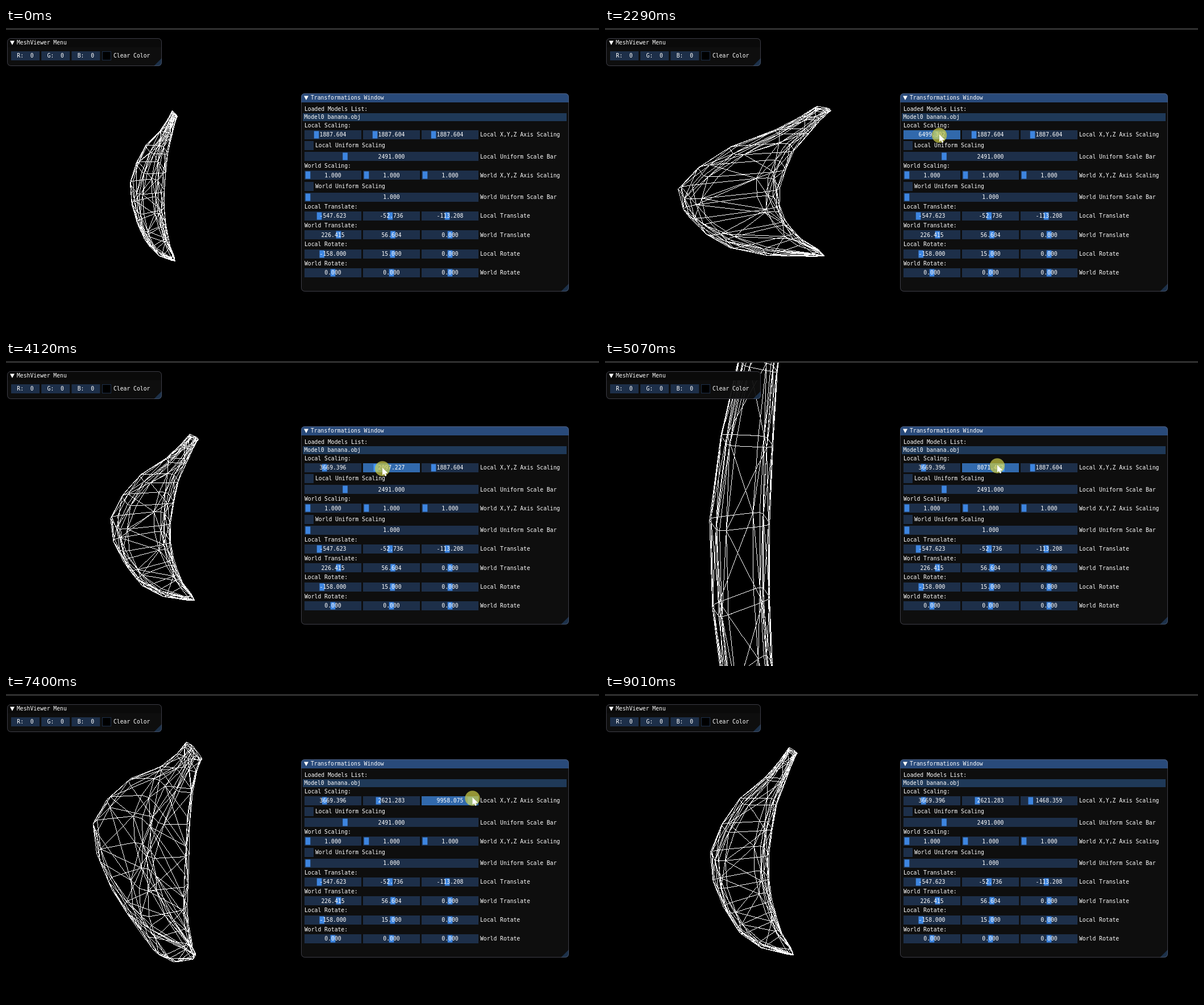
An HTML page with a canvas for the animation above (9550 ms loop, 1043 by 537 pixels).

```html
<!DOCTYPE html>
<html lang="en">
<head>
<meta charset="utf-8">
<title>Mesh viewer</title>
<style>
html, body { margin: 0; width: 100%; height: 100%; overflow: hidden; background: #000; }
canvas { display: block; }
</style>
</head>
<body>
<canvas id="view" width="1043" height="537"></canvas>
<script>
const W = 1043, H = 537, LOOP = 9550;
const ctx = document.getElementById('view').getContext('2d');
const image = ctx.createImageData(W, H);
const pixels = new Uint32Array(image.data.buffer);

const FRAME = 'rgb(29,47,73)', HOVER = 'rgb(35,69,109)', ACTIVE = 'rgb(49,105,172)';
const GRAB = 'rgb(61,133,224)', GRAB_ON = 'rgb(66,150,250)';
const PANEL = 'rgba(15,15,15,.94)', BORDER = 'rgba(110,110,128,.5)';

// Monotone curve through [position, value] keys.
function track(...keys) {
  const slope = i => (keys[i + 1][1] - keys[i][1]) / (keys[i + 1][0] - keys[i][0]);
  const tangent = i => {
    if (i === 0 || i === keys.length - 1) return 0;
    const a = slope(i - 1), b = slope(i);
    return a * b > 0 ? 2 * a * b / (a + b) : 0;
  };
  return t => {
    if (t <= keys[0][0]) return keys[0][1];
    const i = keys.findIndex(k => k[0] > t) - 1;
    if (i < 0) return keys[keys.length - 1][1];
    const [t0, v0] = keys[i], [t1, v1] = keys[i + 1];
    const d = t1 - t0, u = (t - t0) / d, w = 1 - u;
    return v0 * w * w * (1 + 2 * u) + v1 * u * u * (3 - 2 * u)
      + d * u * w * (tangent(i) * w - tangent(i + 1) * u);
  };
}

// The pointer enters, drags each slider out and back, then leaves.
const pointerX = track(
  [120, 963], [1070, 546], [1330, 546],
  [2220, 582.8], [2290, 588], [2480, 593], [3450, 560.3],
  [3790, 648], [3990, 649.1], [4050, 650.7], [4120, 662], [4800, 714], [5000, 698.4], [5070, 690], [5560, 654.9],
  [5780, 654.9], [6340, 752], [6480, 752.1], [6610, 757.1], [6680, 771], [7330, 816.4], [7400, 820.5], [8350, 748.7],
  [8540, 748.7], [8950, 991]
);
const pointerY = track([120, 523], [1070, 187], [4120, 188], [5070, 183], [7400, 182], [8540, 187], [8950, 506]);
const drags = [[1330, 3450], [3990, 5780], [6480, 8540]];

// A scale follows the pointer a little late, in whole slider steps.
const LAG = 70, STEP = 104.811318, STEP_PX = 0.836;
const sliderX = i => 525 + 103 * i;
function scaleAt(t, i) {
  const [from, to] = drags[i];
  const x = pointerX(Math.max(from, Math.min(to, t - LAG)));
  return Math.min(10000, 1.0002 + STEP * Math.round((x - sliderX(i) - 6) / STEP_PX));
}

// Banana: cross sections spanned between an outer and an inner edge.
const RINGS = 13, SIDES = 12, CX = 260.5, CY = 277;
const outerX = track([0, 324], [0.2, 301], [0.35, 234], [0.53, 188], [0.8, 240], [1, 330]);
const innerX = track([0, 337], [0.2, 323], [0.35, 298], [0.56, 283], [0.87, 309], [1, 331]);
const bulge = v => Math.sign(v) * Math.abs(v) ** 0.3;
const toModel = (x, y) => [(x - CX) / 3544, (y - CY + 0.1 * (x - CX)) / 2430];

const mesh = Array.from({ length: RINGS }, (_, i) => {
  const u = Math.max(0, Math.min(1, 0.088 * (i - 0.15)));
  const y = CY - 182 * Math.cos(Math.PI * u);
  const lift = 29 * Math.sin(Math.PI * u ** 3) - 8 * (1 - u) ** 2;
  const [x0, y0] = toModel(outerX(u), y);
  const [x1, y1] = toModel(innerX(u), y - lift);
  const depth = 0.65 * Math.hypot(x1 - x0, y1 - y0);
  return Array.from({ length: SIDES }, (_, j) => {
    const a = (j + 0.5) * 2 * Math.PI / SIDES;
    const k = (1 + bulge(Math.cos(a))) / 2;
    return [x0 + (x1 - x0) * k, y0 + (y1 - y0) * k, depth * bulge(Math.sin(a))];
  });
});

function line([x0, y0], [x1, y1]) {
  const n = Math.max(1, Math.ceil(Math.max(Math.abs(x1 - x0), Math.abs(y1 - y0))));
  for (let i = 0; i <= n; i++) {
    const x = Math.round(x0 + (x1 - x0) * i / n), y = Math.round(y0 + (y1 - y0) * i / n);
    if (x >= 0 && x < W && y > 2 && y < H) pixels[y * W + x] = 0xffffffff;
  }
}

function drawMesh([sx, sy, sz]) {
  pixels.fill(0xff000000);
  const pts = mesh.map(ring => ring.map(([x, y, z]) => [
    CX + 0.966 * x * sx + 0.259 * z * sz,
    CY + 0.927 * y * sy - 0.097 * x * sx + 0.362 * z * sz
  ]));
  pts.forEach((ring, i) => ring.forEach((p, j) => {
    const k = (j + 1) % SIDES, next = pts[i + 1];
    line(p, ring[k]);
    if (!next) return;
    line(p, next[j]);
    if ((i + j) % 2) line(p, next[k]);
    else line(ring[k], next[j]);
  }));
  ctx.putImageData(image, 0, 0);
}

function rect(x, y, w, h, color) {
  ctx.fillStyle = color;
  ctx.fillRect(x, y, w, h);
}

function poly(points, color) {
  ctx.fillStyle = color;
  ctx.beginPath();
  points.forEach(([x, y]) => ctx.lineTo(x, y));
  ctx.closePath();
  ctx.fill();
}

function text(str, x, cy, align = 'left') {
  ctx.fillStyle = '#fff';
  ctx.textAlign = align;
  ctx.fillText(str, x, Math.round(cy + 3.4));
}

function panel(x, y, w, h, title, titleColor) {
  ctx.save();
  ctx.beginPath();
  ctx.roundRect(x, y, w, h, 6);
  ctx.clip();
  rect(x, y, w, h, PANEL);
  rect(x, y, w, 16, titleColor);
  poly([[x + w, y + h - 14], [x + w, y + h], [x + w - 14, y + h]], 'rgb(28,49,74)');
  ctx.restore();
  ctx.strokeStyle = BORDER;
  ctx.lineWidth = 1;
  ctx.beginPath();
  ctx.roundRect(x + 0.5, y + 0.5, w - 1, h - 1, 6);
  ctx.stroke();
  poly([[x + 5, y + 4.5], [x + 13, y + 4.5], [x + 9, y + 12]], '#fff');
  text(title, x + 17, y + 8);
}

function frame(x, cy, w, color = FRAME) {
  rect(x, Math.round(cy) - 8, w, 16, color);
}

// The grab sits at origin + value * unit pixels.
function slider(x, cy, w, value, origin, unit, state = 0) {
  frame(x, cy, w, [FRAME, HOVER, ACTIVE][state]);
  rect(x + origin + value * unit - 4.3, Math.round(cy) - 6.5, 8.6, 13, state === 2 ? GRAB_ON : GRAB);
  text(value.toFixed(3), x + w / 2, cy, 'center');
}

function drawMenu() {
  panel(2, 18, 272, 49, 'MeshViewer Menu', 'rgb(10,10,10)');
  [...'RGB'].forEach((c, i) => {
    const x = 9 + 53.2 * i;
    frame(x, 49, 50);
    text(c + ':  0', x + 25, 49, 'center');
  });
  frame(169, 49, 16);
  rect(170, 42, 14, 14, '#000');
  text('Clear Color', 189, 49);
}

function drawTransforms(scale, states) {
  const LABEL = 16.65, ROW = 19.15, LEFT = 525, RIGHT = 834;
  let y = 171.2;

  const vector = (heading, label, values, origin, unit, active = []) => {
    text(heading + ':', LEFT, y);
    y += LABEL;
    values.forEach((v, i) => slider(sliderX(i), y, 100, v, origin, unit, active[i]));
    text(label, RIGHT, y);
  };
  const scaling = (space, values, size, active) => {
    vector(space + ' Scaling', space + ' X,Y,Z Axis Scaling', values, 6, STEP_PX / STEP, active);
    y += ROW;
    frame(LEFT, y, 16);
    text(space + ' Uniform Scaling', LEFT + 19, y);
    y += ROW;
    slider(LEFT, y, 306, size, 6, 0.0263);
    text(space + ' Uniform Scale Bar', RIGHT, y);
    y += LABEL;
  };
  const centered = (name, values, unit) => {
    vector(name, name, values, 50, unit);
    y += LABEL;
  };

  panel(519, 115, 471, 349, 'Transformations Window', 'rgb(41,74,122)');
  text('Loaded Models List:', LEFT, 143);
  rect(522, 150, 464, 14, 'rgb(31,57,88)');
  text('Model0 banana.obj', LEFT - 0.5, 157);
  scaling('Local', scale, 2491, states);
  scaling('World', [1, 1, 1], 1);
  centered('Local Translate', [-547.623, -52.736, -113.208], 0.0437);
  centered('World Translate', [226.415, 56.604, 0], 0.0437);
  centered('Local Rotate', [-158, 15, 0], 0.122);
  centered('World Rotate', [0, 0, 0], 0.122);
}

function drawPointer(x, y, pressed) {
  if (pressed) {
    ctx.fillStyle = 'rgba(205,205,70,.7)';
    ctx.beginPath();
    ctx.arc(x, y + 1.5, 13.2, 0, 2 * Math.PI);
    ctx.fill();
  }
  poly([[0, 0], [0, 13], [3, 10.4], [5, 15], [7.2, 14], [5.3, 9.7], [9.5, 9.5]]
    .map(([dx, dy]) => [x + dx, y + dy]), '#fff');
}

function draw(t) {
  const scale = drags.map((_, i) => scaleAt(t, i));
  const x = pointerX(t), y = pointerY(t);
  const visible = t >= 120 && t < 9010;
  const held = drags.findIndex(([from, to]) => t >= from && t < to);
  const states = drags.map((_, i) => {
    if (held >= 0) return held === i ? 2 : 0;
    const over = x >= sliderX(i) && x < sliderX(i) + 100 && y >= 180 && y < 196;
    return visible && t > drags[0][0] && over ? 1 : 0;
  });

  drawMesh(scale);
  rect(0, 0, W, 1, '#1c1c1c');
  rect(0, 1, W, 2, '#383838');
  ctx.font = '9.72px "DejaVu Sans Mono", "Liberation Mono", monospace';
  drawMenu();
  drawTransforms(scale, states);
  if (visible) drawPointer(x, y, held >= 0);
}

const start = performance.now();
function tick() {
  draw((performance.now() - start) % LOOP);
  requestAnimationFrame(tick);
}
tick();
</script>
</body>
</html>
```
